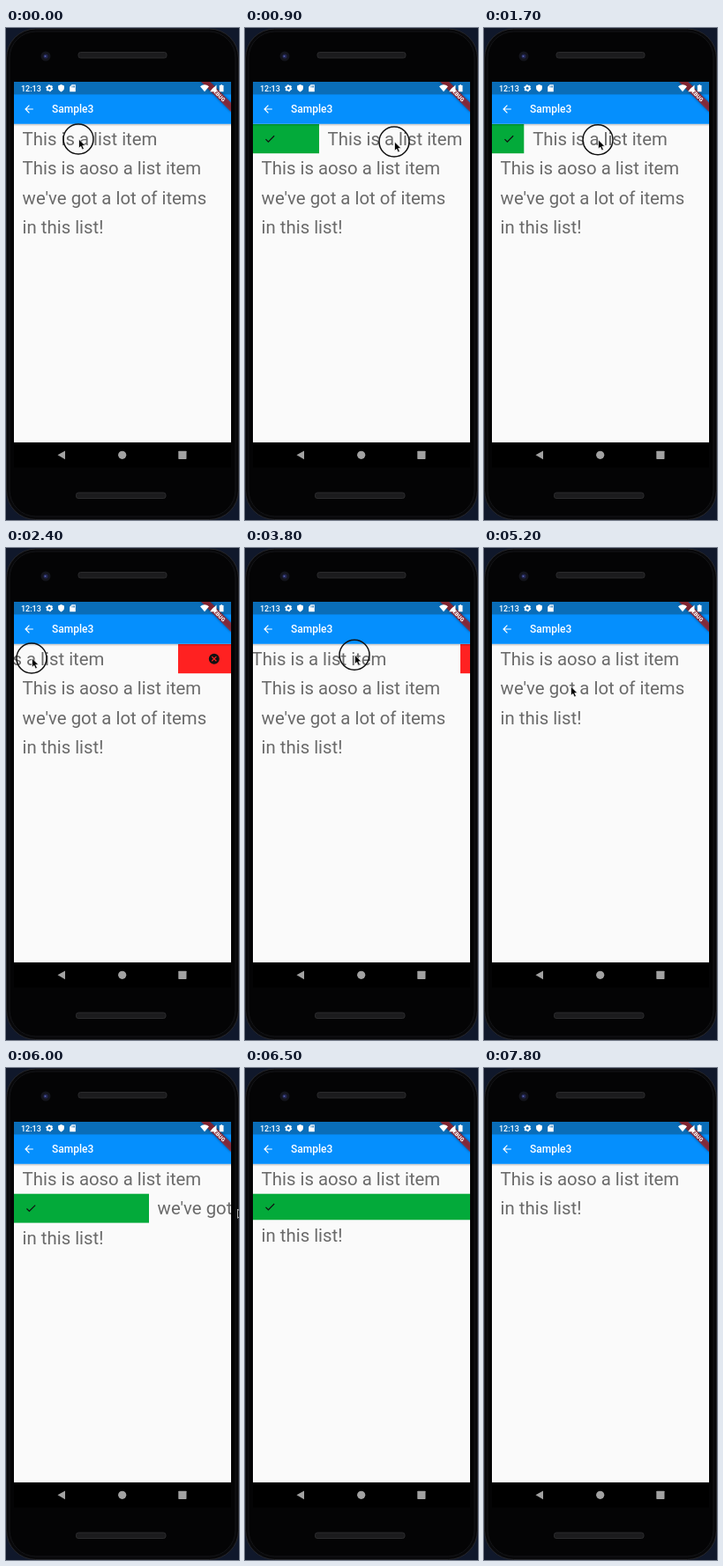
Recreate the animation shown at these times as an HTML page. Size 264 by 558 pixels, loop 7.9 s.

```html
<!DOCTYPE html>
<html lang="en">
<head>
<meta charset="utf-8">
<title>Swipe to dismiss</title>
<style>
  html, body { margin: 0; width: 100%; height: 100%; overflow: hidden; background: #0c1220; }
  svg { display: block; }
  text { font-family: Roboto, sans-serif; }
  .item { font-size: 20.35px; fill: #6a6a6a; }
</style>
</head>
<body>
<svg width="264" height="558" viewBox="0 0 264 558">
  <defs>
    <linearGradient id="shade" x2="0" y2="1">
      <stop stop-opacity=".22"/><stop offset="1" stop-opacity="0"/>
    </linearGradient>
    <filter id="soft" x="-20%" y="-100%" width="140%" height="300%"><feGaussianBlur stdDeviation="1.5"/></filter>
  </defs>

  <!-- phone body -->
  <rect width="264" height="558" fill="#10182b"/>
  <rect x=".5" y="1" width="263" height="556.5" rx="33" fill="#08080a" stroke="#26272b"/>
  <rect x="4" y="4" width="256" height="550" rx="30" fill="#040405" stroke="#141518"/>
  <circle cx="45" cy="32" r="5.5" fill="#14151c"/>
  <circle cx="45" cy="32" r="2.6" fill="#20244e"/>
  <circle cx="44.5" cy="32" r="1.1" fill="#5660a8"/>
  <g fill="#1b1b1d" stroke="#2b2b2d">
    <rect x="82" y="27.5" width="100" height="6.5" rx="2.5"/>
    <rect x="79.500" y="527" width="101.500" height="6.500" rx="2.500"/>
  </g>
  <rect x="9" y="470" width="246" height="28.500" fill="#000"/>
  <g fill="#a2a2a2">
    <path d="M58.500 484.300l8.500-4.900v9.800z"/>
    <circle cx="131.700" cy="484.300" r="4.600"/>
    <rect x="195.300" y="479.700" width="9.200" height="9.200" rx=".6"/>
  </g>

  <svg x="9" y="61" width="246" height="409" overflow="hidden">
    <rect width="246" height="409" fill="#fafafa"/>
    <g id="rows"></g>
    <rect y="47.700" width="246" height="3" fill="url(#shade)"/>
    <rect width="246" height="47.800" fill="#058ffd"/>
    <rect width="246" height="14.400" fill="#0a6db8"/>
    <path transform="translate(9.800 23.800) scale(.6)" fill="#fff"
      d="M20 11H7.830l5.590-5.590L12 4l-8 8 8 8 1.410-1.410L7.830 13H20z"/>
    <text x="43" y="35.300" font-size="12" font-weight="500" fill="#fff">Sample3</text>

    <g transform="translate(246 0) rotate(45)">
      <rect x="-24" y="16.800" width="48" height="7.200" opacity=".5" filter="url(#soft)"/>
      <rect x="-24" y="16.800" width="48" height="7.200" fill="#b71c1c" opacity=".7"/>
      <text y="22.600" font-size="6.100" font-weight="900" text-anchor="middle" fill="#fff">DEBUG</text>
    </g>

    <!-- status bar -->
    <g fill="#fff">
      <text x="8" y="10.500" font-size="9" font-weight="500">12:13</text>
      <circle cx="40.200" cy="7.200" r="2.400" fill="none" stroke="#fff" stroke-width="1.800"/>
      <circle cx="40.200" cy="7.200" r="3.500" fill="none" stroke="#fff" stroke-width="1.100" stroke-dasharray="1.830"/>
      <path d="M53.500 3l3.400 1.500v2.600q0 3-3.400 4.400q-3.400-1.400-3.400-4.400V4.500z"/>
      <path d="M65.500 3.300h4.300v8h-6.600V5.700zM65.600 4.600v1.800h.7V4.600zm1.300 0v1.800h.7V4.600zm1.300 0v1.800h.7V4.600z" fill-rule="evenodd"/>
      <path d="M211 5.200q5-3.800 10 0l-5 6z"/>
      <path d="M229.500 3.500v7.700h-7.500z"/>
      <path d="M234.300 3.300h1.700v.8h1.500v7.200h-4.700V4.100h1.500z"/>
    </g>
  </svg>

  <g id="pointer">
    <circle id="ring" r="17" fill="none" stroke="#111" stroke-width="1.500"/>
    <path d="M.5 0v10.300l2.300-2.100 1.700 3.700 1.900-.8-1.700-3.600h3.200z" fill="#000" stroke="#fff" stroke-width=".7"/>
  </g>
</svg>

<script>
const LOOP = 7900, STEP = 100, WIDTH = 246, ROW = 33.4, TOP = 48;
const CHECK = 'M9 16.170L4.830 12l-1.420 1.410L9 19 21 7l-1.410-1.410z';
const CANCEL = 'M12 2a10 10 0 1 0 0 20a10 10 0 1 0 0-20zm5 13.590L15.590 17 12 13.410 8.410 17 7 15.590 10.590 12 7 8.410 8.410 7 12 10.590 15.590 7 17 8.410 13.410 12z';

// Tracks are [time, value] keys
const pointerX = [[0, 82], [900, 169], [1300, 172], [2400, 29], [2600, 27], [3100, 132], [3500, 147],
  [3800, 124], [4200, 20], [4500, 26], [5200, 98], [5400, 109], [6000, 262], [6200, 285]];
const pointerY = [[0, 126], [900, 129], [2400, 125], [3500, 121], [4300, 122], [5200, 157], [6000, 160]];
const items = [
  { text: 'This is a list item', collapse: 4445,
    drag: [[100, 0], [900, 75], [1300, 78], [2400, -60], [2600, -62], [3100, 38], [3300, 0],
      [3600, 0], [3800, -11], [4200, -115], [4400, -WIDTH]] },
  { text: 'This is aoso a list item' },
  { text: "we've got a lot of items", collapse: 6345,
    drag: [[5400, 0], [6000, 153], [6200, WIDTH]] },
  { text: 'in this list!' }
];
const [rows, pointer, ring] = ['rows', 'pointer', 'ring'].map(id => document.getElementById(id));

const smooth = u => { u = Math.min(1, Math.max(0, u)); return u * u * (3 - 2 * u); };

function at(keys, t) {
  let [time, value] = keys[0];
  for (const [nextTime, next] of keys) {
    if (t < nextTime) return value + (next - value) * smooth((t - time) / (nextTime - time));
    time = nextTime;
    value = next;
  }
  return value;
}

function background(offset, y, h) {
  const w = Math.abs(offset), right = offset > 0;
  const x = right ? 0 : WIDTH - w;
  const iconX = (right ? 12 : WIDTH - 26.4) - x;
  return `<svg x="${x}" y="${y}" width="${w}" height="${h}" overflow="hidden">
    <rect width="${w}" height="${h}" fill="${right ? '#03aa3a' : '#ff2121'}"/>
    <path transform="translate(${iconX} ${h / 2 - 7.2}) scale(.6)" d="${right ? CHECK : CANCEL}" fill="#111" fill-rule="evenodd"/>
  </svg>`;
}

function drawRows(t) {
  let y = TOP, out = '';
  for (const { text, drag, collapse } of items) {
    const offset = drag ? at(drag, t) : 0;
    const h = collapse ? ROW * (1 - smooth((t - collapse - 120) / 180)) : ROW;
    if (offset && h > 0) out += background(offset, y, h);
    if (Math.abs(offset) < WIDTH) out += `<text class="item" x="${9.6 + offset}" y="${y + 24}">${text}</text>`;
    y += h;
  }
  rows.innerHTML = out;
}

function draw(t) {
  drawRows(t);
  const pressed = t < 3100 || (t >= 3500 && t < 4250) || (t >= 5300 && t < 6000);
  pointer.setAttribute('transform', `translate(${at(pointerX, t)} ${at(pointerY, t)})`);
  ring.style.display = pressed ? '' : 'none';
}

const start = performance.now();
let shown = -1;
function tick() {
  const t = Math.floor((performance.now() - start) % LOOP / STEP) * STEP;
  if (t !== shown) draw(shown = t);
  requestAnimationFrame(tick);
}
tick();
</script>
</body>
</html>
```
